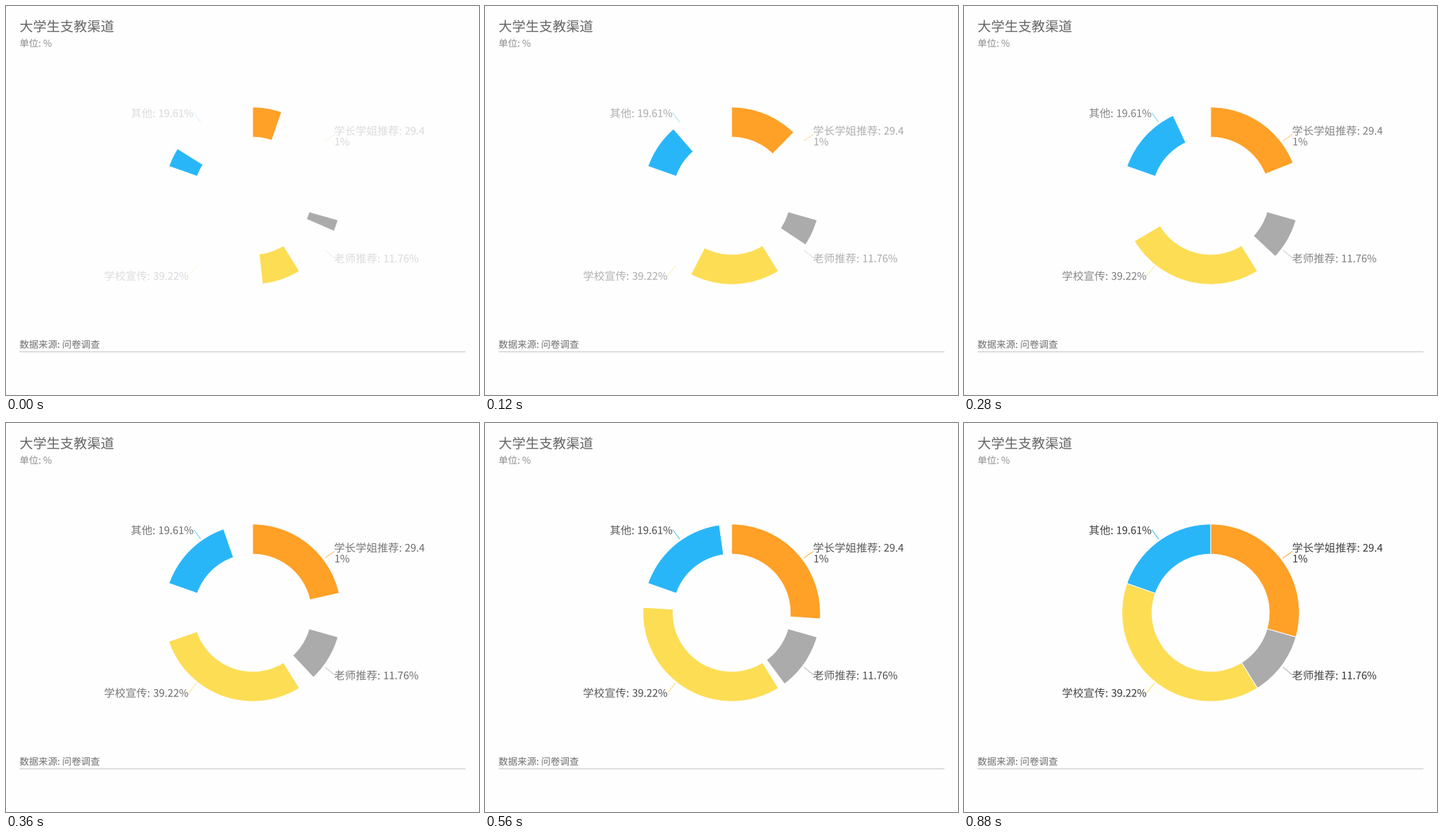
A matplotlib script for the animation above (2.92 s loop, 700 by 576 pixels).

```python
import numpy as np
import matplotlib.pyplot as plt
from matplotlib.animation import FuncAnimation
from matplotlib.colors import to_rgb
from matplotlib.patches import Rectangle, Wedge
from matplotlib.patheffects import Normal

W, H, DPI = 700, 576, 100
PX = 72 / DPI
FRAMES, STEP = 73, 40
CENTER, OUTER, INNER = (365, 281), 131.25, 86.8
PAPER = "#fefefe"
NAME_INK, VALUE_INK = "#464646", "#333333"

plt.rcParams["font.family"] = "Noto Sans CJK JP"
plt.rcParams["text.hinting"] = "none"

fig = plt.figure(figsize=(W / DPI, H / DPI), dpi=DPI, facecolor=PAPER)
ax = fig.add_axes([0, 0, 1, 1])
ax.set_xlim(0, W)
ax.set_ylim(H, 0)
ax.axis("off")


def write(x, y, s, size, color):
    # drawn as a path, so it keeps its sub-pixel place
    return ax.text(x, y, s, fontsize=size * PX, color=color, va="baseline",
                   path_effects=[Normal()])


def fade(color, p):
    paper = np.array(to_rgb(PAPER))
    return tuple(paper + p * (np.array(to_rgb(color)) - paper))


def progress(i):
    """Ease-out shared by the sweep and the label fade."""
    x = np.interp(i, [0, 3, 7, 11, 14, 18, 22],
                  [.0763, .1953, .339, .475, .582, .731, 1])
    return 1 - (1 - x) ** 2.5


write(20, 37.4, "大学生支教渠道", 20, "#666666")
write(20, 60.2, "单位: %", 14, "#8c8c8c")
write(20, 506.2, "数据来源: 问卷调查", 14, "#707070")
ax.add_patch(Rectangle((20, 511), 660, 2, color="#dddddd", lw=0))

# share, colour, leader line, name at (x, y), value pieces
SLICES = [
    (29.41, "#ffa027", [(472, 200), (486, 190)], ("学长学姐推荐:", 485.5, 190.6),
     [("29.4", 590, 190.4), ("1%", 486, 206.4)]),
    (11.76, "#ababab", [(472, 361.5), (486, 373)], ("老师推荐:", 485.5, 379.6),
     [("11.76%", 558.3, 379.4)]),
    (39.22, "#fddd54", [(282, 385), (270, 400)], ("学校宣传:", 145, 405.6),
     [("39.22%", 217.8, 405.4)]),
    (19.61, "#29b6f8", [(278, 158), (288, 172)], ("其他:", 184.7, 164.6),
     [("19.61%", 225.3, 164.4)]),
]

wedges, leaders, labels = [], [], []
start = -90
for share, color, line, (name, nx, ny), parts in SLICES:
    sweep = share * 3.6
    wedge = Wedge(CENTER, OUTER, start, start + sweep, width=OUTER - INNER,
                  facecolor=color, edgecolor=PAPER, lw=PX)
    ax.add_patch(wedge)
    wedges.append((wedge, start, sweep))
    start += sweep
    leader, = ax.plot(*zip(*line), lw=PX, solid_capstyle="butt")
    leaders.append((leader, color))
    labels.append((write(nx, ny, name, 16, NAME_INK), NAME_INK))
    labels += [(write(x, y, s, 15.3, VALUE_INK), VALUE_INK) for s, x, y in parts]


def update(i):
    p = progress(i)
    for wedge, a, sweep in wedges:
        wedge.set_theta2(a + sweep * p)
    for item, color in leaders + labels:
        item.set_color(fade(color, p))
    return []


anim = FuncAnimation(fig, update, frames=FRAMES, interval=STEP,
                     repeat=True, repeat_delay=0, blit=False)
plt.show()
```
